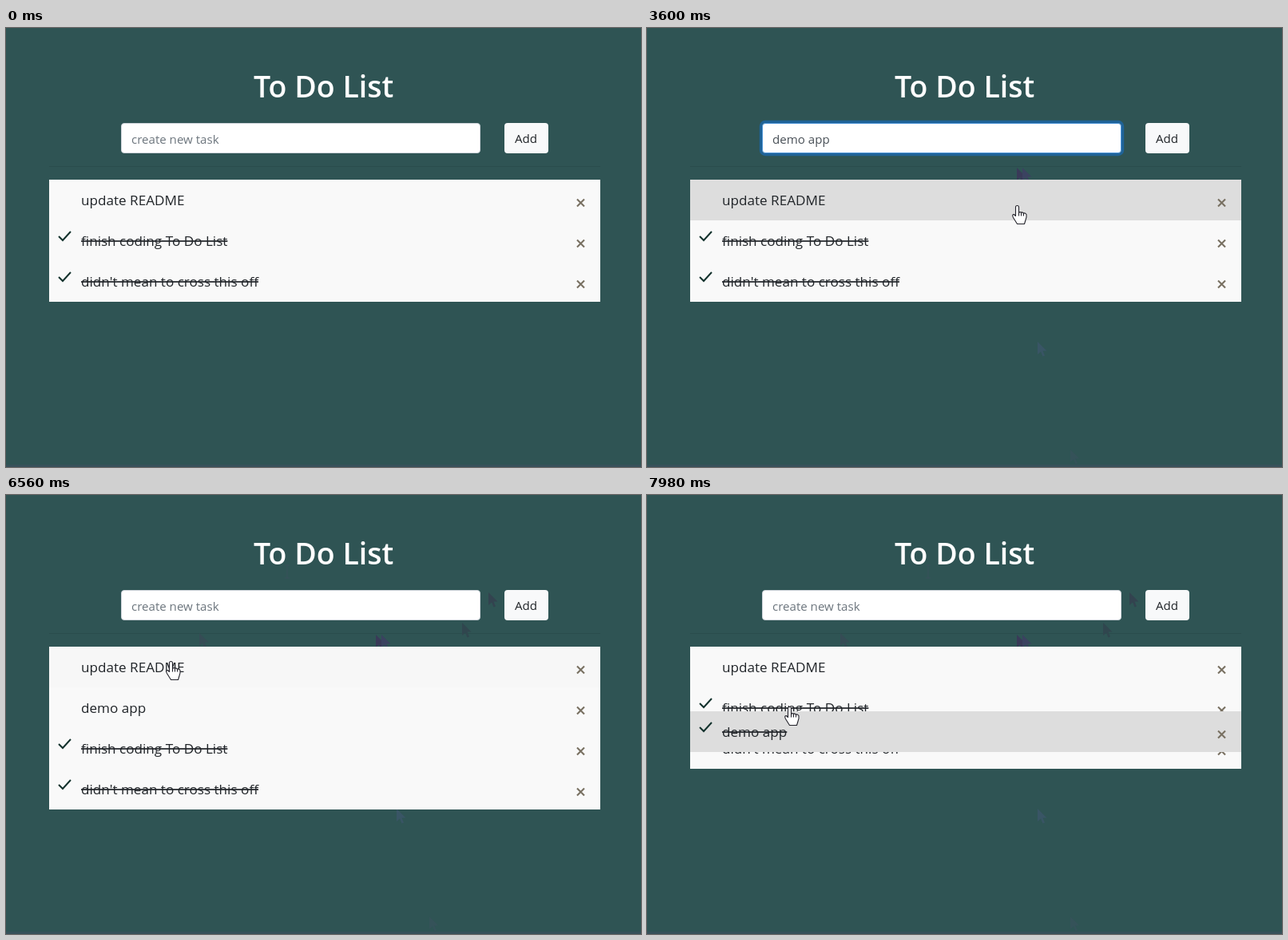
Animation, 795 px wide and 550 px high, one loop 8000 ms. Source, as an HTML page:

```html
<!DOCTYPE html>
<html lang="en">
<head>
<meta charset="utf-8">
<title>To Do List</title>
<style>
  html, body { margin: 0; width: 100%; height: 100%; overflow: hidden; background: #2f5454; }
  svg { display: block; width: 795px; height: 550px; }
  text { font: 15.1px "Open Sans", "Noto Sans", sans-serif; fill: #212529; white-space: pre; }
  .title { font-size: 37.5px; font-weight: 600; fill: #fff; }
  .row text { font-size: 17.12px; }
  .row path { fill: none; stroke: #776f60; stroke-width: 2.1; }
  .row .check { stroke: #12312c; stroke-width: 2; }
  .row.done text { text-decoration: line-through; }
  .row:not(.done) .check { display: none; }
  .hand, .arrow { fill: #fff; stroke: #23232b; stroke-width: 1.1; stroke-linejoin: round; }
  .ibeam { fill: none; stroke: #222; }
</style>
</head>
<body>
<svg id="stage" viewBox="0 0 795 550">
  <rect width="795" height="550" fill="#2f5454"/>
  <rect y="547" width="795" height="3" fill="#37515a"/>
  <rect x="54" y="173" width="690" height="1" fill="#2a4c4c"/>
  <g id="trails"></g>
  <text class="title" x="310" y="87">To Do List</text>
  <rect id="ring" x="142.4" y="117.4" width="453.2" height="41.2" rx="5.6" fill="none" stroke="#1f6398" stroke-width="3.2"/>
  <rect id="field" x="144.5" y="119.5" width="449" height="37" rx="3.5" fill="#fff"/>
  <text id="entry" x="157" y="145"></text>
  <rect id="caret" y="130" width="1" height="18" fill="#495057"/>
  <rect id="button" x="624" y="119" width="55" height="38" rx="4"/>
  <text x="637" y="144">Add</text>
  <g id="list"></g>
  <path id="cursor"/>
</svg>
<script>
const LOOP = 8000, ADDED = 4810, CHECKED = 7500, MOVED = 7640, FADE = 200;
const $ = id => document.getElementById(id);
const clamp = v => Math.max(0, Math.min(1, v));
const within = (v, a, b) => v >= a && v < b;

function make(parent, tag, attrs) {
  const el = document.createElementNS("http://www.w3.org/2000/svg", tag);
  for (const key in attrs) el.setAttribute(key, attrs[key]);
  return parent.appendChild(el);
}

const SHAPES = {
  arrow: "M0 0V16L4 12.5L6.5 18.5L9 17.5L6.5 11.5H11.5Z",
  hand: "M-2 2Q-2 0 0 0T2 2V9Q3 7.5 5 8.5Q6 8 8 9.5Q10 9 11.5 11Q12 14 10.5 18L9 23H0L-5 15" +
        "Q-7 11-4 11L-2 13ZM2 9V13M5 8.5V13M8 9.5V13",
  ibeam: "M-3-8H3M0-8V8M-3 8H3"
};

// Pointer moves: start, end, number of steps, evenly timed waypoints.
const MOVES = [
  [360, 970, 10, [[530, 530], [489, 393], [463, 175], [470, 138]]],
  [1370, 1920, 8, [[470, 138], [470, 138], [470, 175], [463, 222]]],
  [3930, 4610, 11, [[463, 222], [571, 160], [604, 122], [640, 112], [657, 135]]],
  [5870, 6560, 11, [[657, 135], [500, 90], [352, 96], [242, 173], [206, 208]]],
  [6620, 6621, 1, [[190, 240]]],
  [6710, 6910, 4, [[181, 262], [178, 265]]]
];

// Faint pointer marks left on the page: time, x, y, colour.
const TRAILS = [
  [430, 530, 528, "#355259"],
  [640, 489, 393, "#395565"],
  [840, 463, 175, "#393a58"],
  [1800, 470, 175, "#3b4260"],
  [4120, 571, 160, "#30464e"],
  [4300, 604, 122, "#33434f"],
  [6250, 352, 96, "#38505a", "ibeam"],
  [6450, 242, 173, "#364c55"]
].map(([time, x, y, color, shape = "arrow"]) => ({
  time,
  el: make($("trails"), "path", {
    d: SHAPES[shape], transform: `translate(${x} ${y})`,
    ...(shape === "ibeam" ? { stroke: color, fill: "none" } : { fill: color })
  })
}));

const shifted = t => within(t, ADDED, MOVED) ? 51 : 0;
const TASKS = [
  { name: "update README", y: () => 190, hovers: [[700, 3960], [6545, 6710]] },
  { name: "finish coding To Do List", y: t => 241 + shifted(t), done: () => true, hovers: [[650, 700]] },
  { name: "didn't mean to cross this off", y: t => 292 + shifted(t), done: () => true, hovers: [[590, 650]] },
  { name: "demo app", y: t => 241 + 30 * Math.max(0, (t - MOVED) / 340) ** 2,
    from: ADDED, done: t => t >= CHECKED, hovers: [[6710, LOOP + FADE]] }
];
for (const task of TASKS) {
  task.el = make($("list"), "g", {});
  task.back = make(task.el, "rect", { x: 54, width: 690, height: 51 });
  make(task.el, "path", { class: "check", d: "M66 20L71 25L81 14" });
  make(task.el, "text", { x: 94, y: 32 }).textContent = task.name;
  make(task.el, "path", { d: "M715 24.5L724 33.5M724 24.5L715 33.5" });
}

const TYPED = "demo app";
const KEYS = [2190, 2260, 2460, 2530, 2670, 2800, 2930, 3060];

function pointer(t) {
  const move = MOVES.findLast(m => t >= m[0]);
  if (!move) return null;
  const [start, end, steps, points] = move;
  const last = Math.max(1, steps - 1);
  const step = Math.floor(clamp((t - start) / (end - start)) * last + 1e-6);
  const at = step / last * (points.length - 1);
  const i = Math.floor(at), a = points[i], b = points[i + 1] || a;
  return a.map((v, k) => v + (b[k] - v) * (at - i));
}

function pointerKind(x, y, t) {
  const listEnd = within(t, ADDED, MOVED) ? 394 : 343;
  if (within(x, 54, 744) && within(y, 190, listEnd)) return "hand";
  if (within(x, 624, 679) && within(y, 119, 157)) return "hand";
  if (within(x, 144, 594) && within(y, 119, 157)) return "ibeam";
  if (within(x, 310, 488) && within(y, 49, 97)) return "ibeam";
  return "arrow";
}

function drawForm(t) {
  const focus = clamp((t - 1370) / 150) - clamp((t - ADDED) / 150);
  $("ring").setAttribute("opacity", focus);
  $("field").setAttribute("stroke", focus > 0.5 ? "#4a92d6" : "#ced4da");
  const typed = t < ADDED ? TYPED.slice(0, KEYS.filter(k => t >= k).length) : "";
  const entry = $("entry");
  entry.textContent = typed || "create new task";
  entry.style.fill = typed ? "#495057" : "#6c757d";
  const caretOn = within(t, 2190, 3600) || within(t, 4130, 4610);
  $("caret").setAttribute("opacity", caretOn ? 1 : 0);
  $("caret").setAttribute("x", Math.round(157 + entry.getComputedTextLength()));
  $("button").setAttribute("fill", within(t, ADDED, 4900) ? "#e2e6ea" : "#f8f9fa");
}

function drawTask(task, t) {
  const hover = task.hovers.reduce((sum, [a, b]) =>
    sum + clamp((t - a) / FADE) - clamp((t - b) / FADE), 0);
  const shade = Math.round(249 - 28 * clamp(hover));
  task.back.setAttribute("fill", `rgb(${shade},${shade},${shade})`);
  task.el.setAttribute("class", task.done && task.done(t) ? "row done" : "row");
  task.el.setAttribute("transform", `translate(0 ${Math.round(task.y(t))})`);
  task.el.style.display = t >= (task.from || 0) ? "" : "none";
}

function drawPointer(t) {
  const spot = pointer(t), cursor = $("cursor");
  cursor.style.display = spot ? "" : "none";
  if (!spot) return;
  const [x, y] = spot.map(Math.round);
  const kind = pointerKind(x, y, t);
  cursor.setAttribute("class", kind);
  cursor.setAttribute("d", SHAPES[kind]);
  cursor.setAttribute("transform", `translate(${x + 0.5} ${y + 0.5})`);
}

const begin = performance.now();
function render() {
  const t = (performance.now() - begin) % LOOP;
  drawForm(t);
  TASKS.forEach(task => drawTask(task, t));
  TRAILS.forEach(({ time, el }) => el.style.display = t >= time ? "" : "none");
  drawPointer(t);
  requestAnimationFrame(render);
}
render();
</script>
</body>
</html>
```
